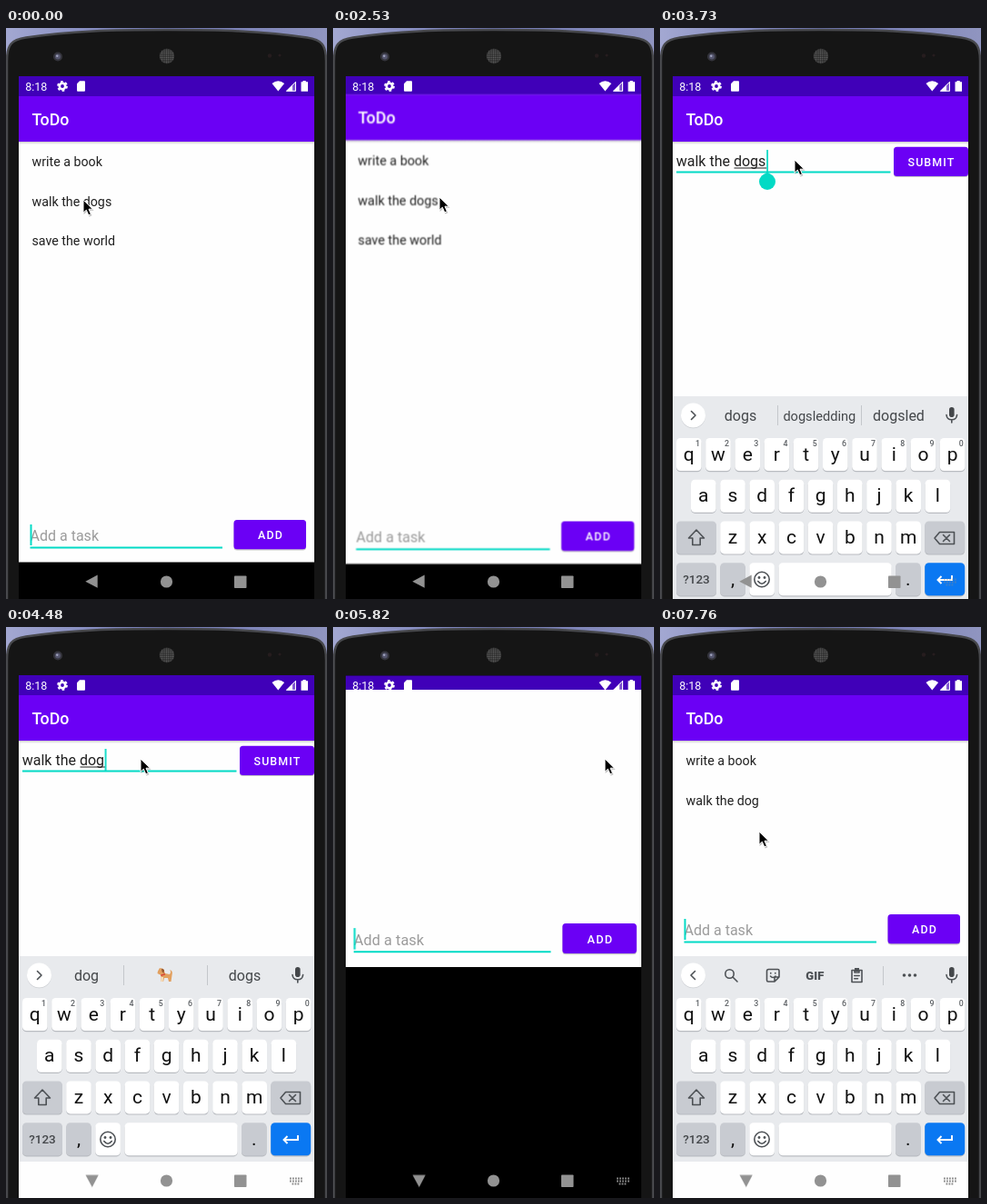
An HTML page that plays this animation: 353x628 px, repeating every 8 s.

```html
<!DOCTYPE html>
<html lang="en">
<head>
<meta charset="utf-8">
<title>ToDo app</title>
<style>
html, body { margin: 0; width: 100%; height: 100%; overflow: hidden; background: #151515; }
svg { display: block; width: 353px; height: 628px; font-family: Roboto, "Open Sans", sans-serif; }
.title { font-size: 17.8px; font-weight: 500; fill: #fff; }
.item { font-size: 14.24px; fill: #202020; }
.entry { font-size: 16.02px; fill: #202020; }
.hint { font-size: 16.02px; fill: #9b9b9b; }
.label { font-size: 12.46px; font-weight: 500; letter-spacing: 1.11px; fill: #fff; }
.word { font-size: 16px; fill: #44474a; text-anchor: middle; }
.letter { font-size: 21px; fill: #111; text-anchor: middle; }
.digit { font-size: 8.8px; font-weight: 500; fill: #5c6064; text-anchor: middle; }
.purple { fill: #6b00f5; }
.teal { fill: #02dac5; }
.line { fill: none; stroke: #4d5155; stroke-width: 1.6; stroke-linejoin: round; stroke-linecap: round; }

/* One shared 8 s clock; every change is a hard step. */
.anim { animation: 8s step-end infinite; }
#list, #edit { transform-origin: 176.5px 341px; }
#ghost { transform-origin: 176.5px 69px; }
#back { transform-origin: 94.7px 608.7px; }
#list { animation-name: list; }
#edit { animation-name: edit; }
#ghost { animation-name: ghost; }
#slot { animation-name: slot; }
#caret { animation-name: caret; }
#pen { animation-name: pen; }
#handle { animation-name: handle; }
#under { animation-name: under; }
#save { animation-name: save; }
.plural { animation-name: plural; }
#board { animation-name: board; }
#words1 { animation-name: words1; }
#words2 { animation-name: words2; }
#tools { animation-name: tools; }
#back { animation-name: back; }
#switch { animation-name: switch; }
#mouse { animation-name: mouse; }

@keyframes list {
  0% { transform: scale(1); opacity: 1; }
  31.625% { transform: scale(1.0075); opacity: 1; }
  33.5% { transform: scale(1.04); opacity: 1; }
  35.375% { transform: scale(1.05); opacity: 1; }
  37.25% { transform: scale(1); opacity: 0; }
  74.625%, 100% { transform: scale(1); opacity: 1; }
}
@keyframes edit {
  0% { transform: scale(.95); opacity: 0; }
  33.5% { transform: scale(.95); opacity: 1; }
  35.375% { transform: scale(.99); opacity: 1; }
  37.25% { transform: scale(1); opacity: 1; }
  69% { transform: scale(.95); opacity: .6; }
  70.875%, 100% { transform: scale(.9); opacity: 0; }
}
@keyframes ghost {
  0% { transform: scale(1.04); opacity: 0; }
  69% { transform: scale(1.04); opacity: 1; }
  70.875% { transform: scale(1.02); opacity: 1; }
  72.75% { transform: scale(1); opacity: 1; }
  74.625%, 100% { transform: scale(1); opacity: 0; }
}
@keyframes slot {
  0% { transform: translateY(0); }
  74.625%, 100% { transform: translateY(-225px); }
}
@keyframes caret {
  0%, 13%, 24.125%, 69%, 85.75%, 97%, 100% { opacity: 1; }
  5.5%, 18.5%, 31.625%, 80.25%, 91.375% { opacity: 0; }
}
@keyframes pen {
  0% { transform: translateX(0); opacity: 0; }
  42.875% { transform: translateX(0); opacity: 1; }
  54.125% { transform: translateX(-8.5px); opacity: 1; }
  59.75% { transform: translateX(-8.5px); opacity: 0; }
  65.375%, 100% { transform: translateX(-8.5px); opacity: 1; }
}
@keyframes handle {
  0%, 54.125%, 100% { opacity: 0; }
  42.875% { opacity: 1; }
}
@keyframes under {
  0% { opacity: 0; }
  44.75%, 100% { opacity: 1; }
}
@keyframes save {
  0% { opacity: 1; }
  93.25%, 100% { opacity: 0; }
}
@keyframes plural {
  0% { fill-opacity: 1; }
  54.125%, 100% { fill-opacity: 0; }
}
@keyframes board {
  0%, 70.875% { transform: translateY(270px); }
  44.75% { transform: translateY(150px); }
  46.625% { transform: translateY(43px); }
  48.5% { transform: translateY(5px); }
  50.375% { transform: translateY(0); }
  69% { transform: translateY(110px); }
  74.625% { transform: translateY(45px); }
  76.5% { transform: translateY(1px); }
  78.375%, 100% { transform: translateY(0); }
}
@keyframes words1 {
  0% { opacity: 1; }
  56%, 100% { opacity: 0; }
}
@keyframes words2 {
  0%, 74.625%, 100% { opacity: 0; }
  56% { opacity: 1; }
}
@keyframes tools {
  0% { opacity: 0; }
  74.625%, 100% { opacity: 1; }
}
@keyframes back {
  0%, 74.625% { transform: rotate(0deg); }
  48.5%, 76.5% { transform: rotate(-10deg); }
  50.375%, 78.375%, 100% { transform: rotate(-90deg); }
}
@keyframes switch {
  0%, 74.625% { opacity: 0; }
  46.625% { opacity: .4; }
  48.5%, 76.5%, 100% { opacity: 1; }
}
@keyframes mouse {
  0% { transform: translate(85px, 189px); }
  16.75% { transform: translate(108px, 187px); }
  18.5% { transform: translate(117px, 186px); }
  39.125% { transform: translate(123px, 178px); }
  41% { transform: translate(140px, 153px); }
  42.875% { transform: translate(148px, 145px); }
  59.75% { transform: translate(220px, 145px); }
  61.625% { transform: translate(299px, 145px); }
  80.25% { transform: translate(280px, 158px); }
  82.125% { transform: translate(200px, 200px); }
  84% { transform: translate(130px, 223px); }
  85.75%, 100% { transform: translate(109px, 225px); }
}
</style>
</head>
<body>
<svg viewBox="0 0 353 628">
  <defs>
    <clipPath id="screen"><path d="M14 53.5H339V628H14Z"/></clipPath>
    <linearGradient id="sky"><stop stop-color="#a3a8d2"/><stop offset=".5" stop-color="#6d75b0"/><stop offset="1" stop-color="#9095c0"/></linearGradient>
    <linearGradient id="fade" x2="0" y2="1"><stop stop-opacity=".2"/><stop offset="1" stop-opacity="0"/></linearGradient>
    <pattern id="mesh" width="2.4" height="2.4" patternUnits="userSpaceOnUse"><path d="M0 0H2.4V2.4H0Z" fill="#2a2a2a"/><circle cx="1.2" cy="1.2" r=".8" fill="#686868"/></pattern>
    <g id="bar">
      <path d="M14 53H339V75H14Z" fill="#4000b8"/>
      <path class="purple" d="M14 75H339V125H14Z"/>
      <path d="M14 125H339V128H14Z" fill="url(#fade)"/>
      <text class="title" x="28.6" y="107">ToDo</text>
    </g>
  </defs>

  <!-- phone body -->
  <path d="M0 0H353V628H0Z" fill="url(#sky)"/>
  <path d="M1 640V36C1 18 6 13 22 10.500C70 3 120 2 176.500 2S283 3 331 10.500C347 13 352 18 352 36V640Z" fill="#151515" stroke="#47484c" stroke-width="2.500"/>
  <circle cx="57" cy="31.500" r="5" fill="#34343c"/>
  <circle cx="57" cy="31.500" r="3" fill="#55566e"/>
  <circle cx="56.300" cy="30.800" r="1.200" fill="#a0a3bd"/>
  <circle cx="177" cy="31" r="8.200" fill="url(#mesh)"/>
  <circle cx="290" cy="30.500" r="2.200" fill="#261d1e"/>
  <circle cx="301" cy="30" r="1.600" fill="#261d1e"/>

  <g clip-path="url(#screen)">
    <path d="M14 53H339V628H14Z"/>
    <path d="M14 53H339V75H14Z" fill="#4000b8"/>

    <g id="list" class="anim">
      <path d="M14 75H339V587.500H14Z" fill="#fefefe"/>
      <use href="#bar"/>
      <g class="item">
        <text x="28.500" y="152.300">write a book</text>
        <text x="28.500" y="195.700">walk the dog<tspan class="anim plural">s</tspan></text>
        <text id="save" class="anim" x="28.500" y="239.100">save the world</text>
      </g>
      <g id="slot" class="anim">
        <g id="input">
          <text class="hint" x="26.500" y="564.300">Add a task</text>
          <path class="teal" d="M26.500 570.500H238V572.500H26.500Z"/>
          <path id="caret" class="teal anim" d="M26.500 546H28.500V569H26.500Z"/>
          <rect x="250.500" y="542.500" width="79.500" height="32" rx="3.500" opacity=".22"/>
          <rect class="purple" x="250.500" y="541" width="79.500" height="32.300" rx="3.500"/>
          <text class="label" x="277" y="562">ADD</text>
        </g>
      </g>
    </g>

    <g id="status">
      <text x="21.300" y="68.700" font-size="12.500" fill="#fff">8:18</text>
      <g fill="none" stroke="#fff">
        <circle cx="62" cy="64" r="3.200" stroke-width="2.600"/>
        <circle cx="62" cy="64" r="5" stroke-width="1.800" stroke-dasharray="2.700 2.536"/>
      </g>
      <g fill="#fff">
        <path d="M81 58.300H86Q87 58.300 87 59.300V68.700Q87 69.700 86 69.700H79Q78 69.700 78 68.700V61.300Z"/>
        <path d="M299.300 69.500L292.500 61Q299.300 55.500 306.100 61Z"/>
        <path d="M308 69.500L319 58.500V69.500Z" opacity=".35"/>
        <path d="M308 69.500L315 62.500V69.500Z"/>
        <path d="M308.500 69.300L318.500 59.300V69.300Z" fill="none" stroke="#fff"/>
        <path d="M326.500 58H329.700V59.200H332V69.700H324.500V59.200H326.500Z"/>
      </g>
    </g>

    <g id="ghost" class="anim">
      <path d="M14 69H339V628H14Z"/>
      <path d="M14 69H339V374H14Z" fill="#fefefe"/>
      <use href="#input" transform="translate(-4.400 2.100) scale(1.025) translate(0 -225)"/>
    </g>

    <g id="edit" class="anim">
      <path d="M14 75H339V587.500H14Z" fill="#fefefe"/>
      <use href="#bar"/>
      <use href="#status"/>
      <text class="entry" x="17.700" y="151.700">walk the dog<tspan class="anim plural">s</tspan></text>
      <path class="teal" d="M18 157.500H253.500V159.500H18Z"/>
      <path id="under" class="anim" d="M81.500 153.500H109V154.500H81.500Z" fill="#202020"/>
      <g id="handle" class="anim">
        <path d="M109 153.500H117V154.500H109Z" fill="#202020"/>
        <circle class="teal" cx="118" cy="169" r="9"/>
        <path class="teal" d="M118 158.500L124.500 163H111.500Z"/>
      </g>
      <path id="pen" class="teal anim" d="M117.200 134H119V158H117.200Z"/>
      <rect x="257" y="132" width="82" height="32" rx="3.500" opacity=".22"/>
      <rect class="purple" x="257" y="130.700" width="82" height="32.300" rx="3.500"/>
      <text class="label" x="272.500" y="151.700">SUBMIT</text>
    </g>

    <g id="board" class="anim">
      <path d="M14 362H339V588H14Z" fill="#e8eaed"/>
      <path d="M14 588H339V640H14Z" fill="#fefefe"/>
      <circle cx="36.500" cy="383.800" r="13.500" fill="#c9ccd0"/>
      <circle cx="36.500" cy="383" r="13.500" fill="#fff"/>
      <g id="words1" class="anim">
        <path class="line" d="M34.500 378.500L39 383L34.500 387.500"/>
        <path d="M129.500 372V394M221.500 372V394" stroke="#c4c7cb"/>
        <text class="word" x="88.500" y="388.700">dogs</text>
        <text class="word" x="175.300" y="388.700" style="font-size:14.600px">dogsledding</text>
        <text class="word" x="262.500" y="388.700">dogsled</text>
      </g>
      <g id="words2" class="anim">
        <path class="line" d="M34.500 378.500L39 383L34.500 387.500"/>
        <path d="M129.500 372V394M221.500 372V394" stroke="#c4c7cb"/>
        <text class="word" x="88.500" y="388.700">dog</text>
        <text class="word" x="262.500" y="388.700">dogs</text>
        <path d="M169 375L173 376L175 381L180 382Q182 379 180 377Q184 378 182.500 383L181.500 390H179L178 386H174L173 390H170.500V383L166.500 381L167 378.500Z" fill="#e2a05f"/>
        <path d="M171 375.500L174 377L173.500 381L171.500 379Z" fill="#94552f"/>
        <path d="M170 382.500L175 381V382.500L170.500 384Z" fill="#d84438"/>
        <path d="M170.500 385H173L172.500 390H170.500Z" fill="#f6dfbf"/>
      </g>
      <g id="tools" class="anim">
        <path class="line" d="M38.500 378.500L34 383L38.500 387.500"/>
        <g class="line">
          <circle cx="76.500" cy="381.500" r="4.700"/>
          <path d="M80 385L85 390"/>
          <path d="M119.500 376.500H129.500Q131 376.500 131 378V385L126 390H119Q117.500 390 117.500 388.500V378.500Q117.500 376.500 119.500 376.500ZM131 385H126V390M121.500 384Q124 387 127 384"/>
          <path d="M121.800 380.500V381M126.800 380.500V381"/>
          <path d="M211 377.500H222V390.500H211ZM214 377.500V380H219V377.500M213.800 383.500H219.200M213.800 386.800H217.500"/>
        </g>
        <path d="M214 375H219V379H214Z" fill="#4d5155"/>
        <text x="170.300" y="388" font-size="13" font-weight="900" fill="#4d5155" text-anchor="middle">GIF</text>
        <path d="M245.500 373V394" stroke="#c4c7cb"/>
        <g fill="#4d5155"><circle cx="268.500" cy="383" r="1.800"/><circle cx="274.500" cy="383" r="1.800"/><circle cx="280.500" cy="383" r="1.800"/></g>
      </g>
      <rect x="318" y="374" width="5.600" height="11" rx="2.800" fill="#44474a"/>
      <path class="line" d="M315 382.500Q315.500 387.800 320.800 387.800T326.600 382.500M320.800 388V391"/>
      <g id="keys"></g>
      <path class="line" d="M40 509L48.500 518H44.200V525.500H35.800V518H31.500Z"/>
      <path class="line" d="M307.500 511.500H323.500V524.500H307.500L302 518ZM311.500 514.500L318.500 521.500M318.500 514.500L311.500 521.500"/>
      <circle class="line" cx="112" cy="563.500" r="8.200"/>
      <path class="line" d="M107.800 565.500Q112 571 116.200 565.500"/>
      <circle cx="109" cy="561.500" r="1.400" fill="#4d5155"/><circle cx="115" cy="561.500" r="1.400" fill="#4d5155"/>
      <path d="M321 559V564H306M309.500 560L305.500 564L309.500 568" fill="none" stroke="#fff" stroke-width="1.900"/>
    </g>

    <!-- navigation buttons -->
    <g fill="#929292">
      <path id="back" class="anim" d="M87.300 608.700L100.700 601.600V615.800Z"/>
      <circle cx="176.500" cy="609" r="6.600"/>
      <rect x="251" y="602.500" width="13.500" height="13.500" rx=".8"/>
      <path id="switch" class="anim" d="M312 606.500H326M312 609.500H326M314.500 612.500H323.500" stroke="#8a8a8a" stroke-width="1.800" stroke-dasharray="1.800 1.200"/>
    </g>
  </g>

  <g id="mouse" class="anim">
    <path d="M0 1V15L3.500 11.800L6 17.500L8.800 16.300L6.400 10.800H11Z" opacity=".25" transform="translate(.6 1)"/>
    <path d="M0 0V14.300L3.300 11.200L5.800 16.800L8.400 15.700L6 10.200H10.500Z" fill="#000" stroke="#fff" stroke-width="1"/>
  </g>
</svg>
<script>
const keys = [];
const pitch = 32.2;

function key(x, y, w, fill) {
  const rect = (dy, color) =>
    `<rect x="${x}" y="${y + dy}" width="${w}" height="36" rx="4.5" fill="${color}"/>`;
  keys.push(rect(1.2, "#b9bcc1"), rect(0, fill));
}

function text(x, y, kind, s) {
  keys.push(`<text class="${kind}" x="${x}" y="${y}">${s}</text>`);
}

function row(letters, left, top, digits) {
  [...letters].forEach((c, i) => {
    const x = left + i * pitch;
    key(x, top, 27.6, "#fff");
    text(x + 13.8, top + 24.7, "letter", c);
    if (digits) text(x + 23.4, top + 9.3, "digit", (i + 1) % 10);
  });
}

row("qwertyuiop", 18, 408, true);
row("asdfghjkl", 34, 453.7);
row("zxcvbnm", 66.2, 499.4);

const gray = "#c8cbd1";
key(18, 499.4, 44, gray);
key(291.2, 499.4, 44, gray);
key(18, 545.2, 44, gray);
key(66.2, 545.2, 27.6, gray);
key(98.3, 545.2, 27.6, "#fff");
key(130.5, 545.2, 124.2, "#fff");
key(259, 545.2, 27.6, gray);
key(291.2, 545.2, 44, "#0a78f2");
text(80, 570, "letter", ",");
text(272.8, 570, "letter", ".");
keys.push('<text x="40" y="568.3" font-size="13.5" font-weight="500" fill="#44474a" text-anchor="middle">?123</text>');

document.getElementById("keys").innerHTML = keys.join("");
</script>
</body>
</html>
```
